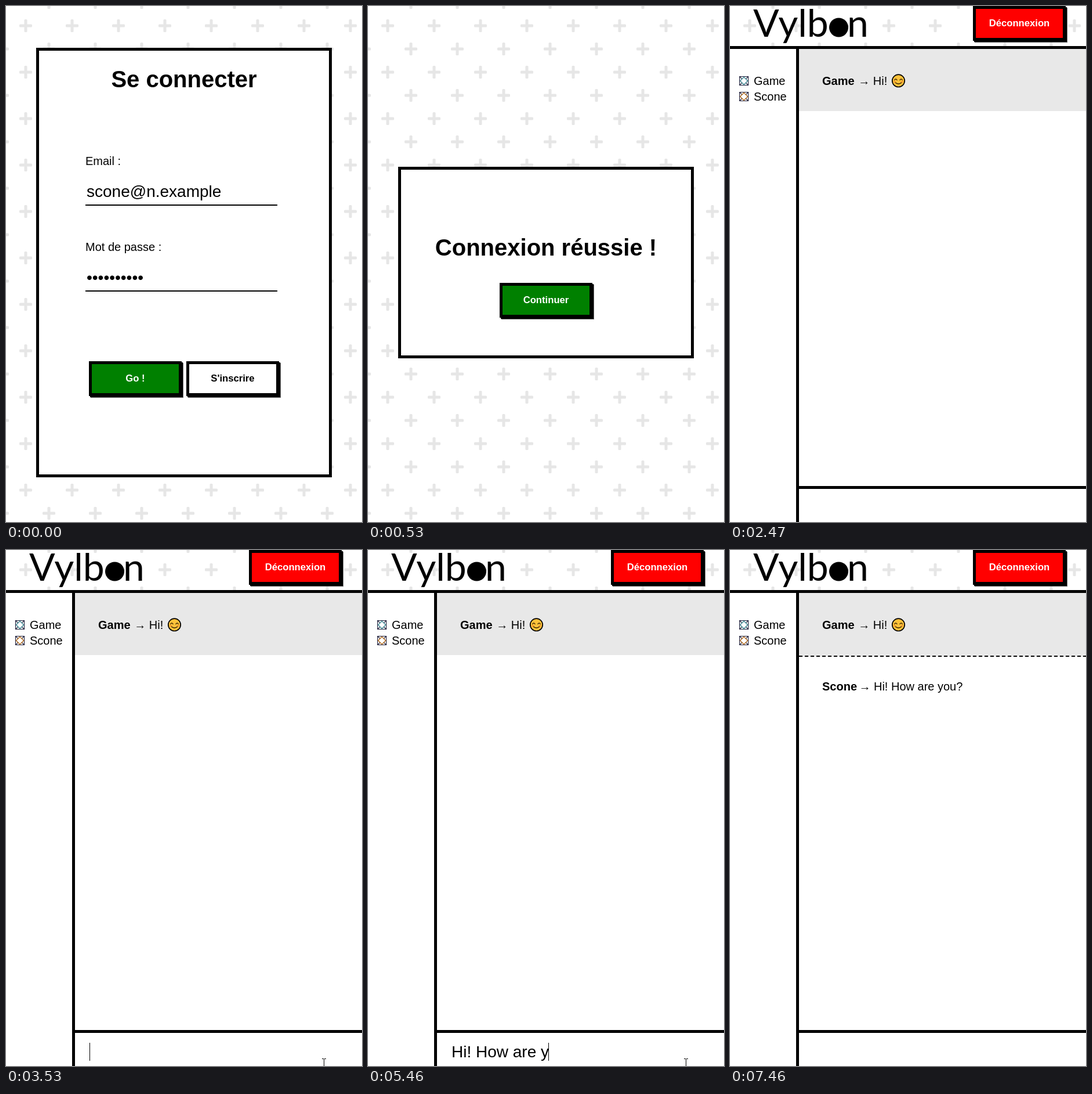
Recreate the animation shown at these times as an HTML page. Size 614 px wide and 889 px high, loop 8000 ms.

```html
<!DOCTYPE html>
<html lang="fr">
<head>
<meta charset="utf-8">
<title>Messagerie</title>
<style>
  html, body { margin: 0; width: 100%; height: 100%; overflow: hidden; background: #fff; }
  svg { display: block; width: 614px; height: 889px; }
  text { font: 20px "Liberation Sans", Arial, sans-serif; white-space: pre; }
  rect { shape-rendering: crispEdges; }
  .title { font-size: 40px; font-weight: bold; text-anchor: middle; }
  .field { font-size: 28px; }
  .label { font-size: 16.67px; font-weight: bold; text-anchor: middle; }
  .bold { font-weight: bold; }
  .brand { font: 66px Lato, sans-serif; }
  .frame { fill: #fff; stroke: #000; stroke-width: 5; }
</style>
</head>
<body>
<svg viewBox="0 0 614 889">
  <defs>
    <g id="plus" fill="#e6e6e6">
      <rect x="23" y="31.5" width="22" height="5" rx="1.5" style="shape-rendering:auto"/>
      <rect x="31.5" y="23" width="5" height="22" rx="1.5" style="shape-rendering:auto"/>
    </g>
    <pattern id="pluses" width="80" height="80" patternUnits="userSpaceOnUse">
      <use href="#plus"/>
      <use href="#plus" x="40" y="40"/>
      <use href="#plus" x="-40" y="-40"/>
      <use href="#plus" x="40" y="-40"/>
      <use href="#plus" x="-40" y="40"/>
    </pattern>
    <g id="avatar" fill="none">
      <path d="M16.5 121.5h15v15h-15zM16.5 121.5l4 4M31.5 121.5l-4 4M16.5 136.5l4-4M31.5 136.5l-4-4" stroke="#1c1c38" stroke-width="1.1"/>
      <path d="M24 122.5l6.5 6.5l-6.5 6.5l-6.5-6.5z" stroke="currentColor" stroke-width="1.3"/>
    </g>
  </defs>
  <rect width="614" height="889" fill="#fff"/>
  <rect width="614" height="889" fill="url(#pluses)"/>

  <g id="login">
    <rect class="frame" x="54.5" y="74.5" width="505" height="735"/>
    <text class="title" x="307" y="140">Se connecter</text>
    <text x="137" y="274">Email :</text>
    <text class="field" x="139" y="329">scone@n.example</text>
    <rect x="137" y="342" width="331" height="2"/>
    <text x="137" y="422">Mot de passe :</text>
    <text class="field" x="139" y="477">••••••••••</text>
    <rect x="137" y="490" width="331" height="2"/>
    <rect id="passCaret" x="236" y="452" width="1" height="31"/>
  </g>

  <g id="success">
    <rect class="frame" x="54.5" y="279.5" width="505" height="325"/>
    <text class="title" x="307" y="430">Connexion réussie !</text>
  </g>

  <g id="chat">
    <rect y="74" width="614" height="815" fill="#fff"/>
    <text class="brand" x="40" y="53">Vylb</text>
    <circle cx="187.5" cy="37" r="16.5"/>
    <text class="brand" x="202" y="53">n</text>
    <rect y="69" width="614" height="5"/>
    <rect x="114" y="74" width="5" height="815"/>
    <rect x="119" y="827" width="495" height="5"/>
    <use href="#avatar" color="#3c8793"/>
    <text x="41" y="136">Game</text>
    <use href="#avatar" y="27" color="#b0691c"/>
    <text x="41" y="163">Scone</text>

    <g id="first">
      <rect id="band" x="119" y="74" width="495" height="107" fill="#e8e8e8"/>
      <text class="bold" x="159" y="136">Game</text>
      <text x="221.2" y="136">→ Hi!</text>
      <g fill="none" stroke="#2b1a00" stroke-width="1.3" stroke-linecap="round">
        <circle cx="290.5" cy="128.8" r="10.7" fill="#ffc23a" stroke="#000" stroke-width="1.7"/>
        <path d="M283.8 127.6q2.1-3.4 4.2 0M293 127.6q2.1-3.4 4.2 0M285.3 132q5.2 4.6 10.4 0"/>
        <path d="M283.7 130.6h1.2M296.1 130.6h1.2" stroke="#f28a2e" stroke-width="2.4"/>
      </g>
    </g>
    <g id="second">
      <path d="M119 183H614" stroke="#000" stroke-width="2" stroke-dasharray="6 4"/>
      <text class="bold" x="159" y="242">Scone</text>
      <text x="222.4" y="242">→ Hi! How are you?</text>
    </g>

    <text id="draft" class="field" x="144" y="874"></text>
    <rect id="caret" y="849" width="1" height="31"/>
    <path id="pointer" d="M545 876.5h3M549 876.5h3M548.5 877v12" stroke="#000" fill="none" shape-rendering="crispEdges"/>
  </g>
</svg>
<script>
const LOOP = 8000;
const MESSAGE = "Hi! How are you?";
const SENT = 6380;
const $ = id => document.getElementById(id);

// Moment at which each character of the message is typed.
const keys = [3730, 3860, 4120, 4320, 4590];
for (let i = 0; i < 8; i++) keys.push(4740 + i * 720 / 7);
keys.push(5520, 5650, 6050);

function addButton(parent, x, y, fill, ink, label) {
  $(parent).insertAdjacentHTML("beforeend", `
    <g transform="translate(${x} ${y})">
      <rect x="3" y="3" width="160" height="60" fill="#666"/>
      <rect x="2" y="2" width="160" height="60"/>
      <rect x="2.5" y="2.5" width="155" height="55" fill="${fill}" stroke="#000" stroke-width="5"/>
      <text class="label" x="80" y="35" fill="${ink}">${label}</text>
    </g>`);
}
addButton("login", 143, 612, "#008000", "#fff", "Go !");
addButton("login", 311, 612, "#fff", "#000", "S'inscrire");
addButton("success", 227, 477, "#008000", "#fff", "Continuer");
addButton("chat", 419, 0, "#f00", "#fff", "Déconnexion");

function show(id, on) {
  $(id).style.display = on ? "" : "none";
}

function render(t) {
  const within = (from, to) => t >= from && t < to;
  show("login", t < 530);
  show("passCaret", t >= 70);
  show("success", within(530, 1680));
  show("chat", t >= 1680);
  show("first", t >= 2470);
  show("second", t >= SENT);
  $("band").setAttribute("height", t < SENT ? 107 : 110);
  show("pointer", within(3260, 6660));

  const typed = t < SENT ? keys.filter(k => k <= t).length : 0;
  const draft = $("draft");
  draft.textContent = MESSAGE.slice(0, typed);
  const width = typed ? draft.getComputedTextLength() : 0;
  $("caret").setAttribute("x", Math.max(144, Math.floor(143.9 + width)));
  show("caret", within(3530, 6790) || within(7190, 7460));
}

const start = performance.now();
function tick() {
  render((performance.now() - start) % LOOP);
  requestAnimationFrame(tick);
}
tick();
</script>
</body>
</html>
```
